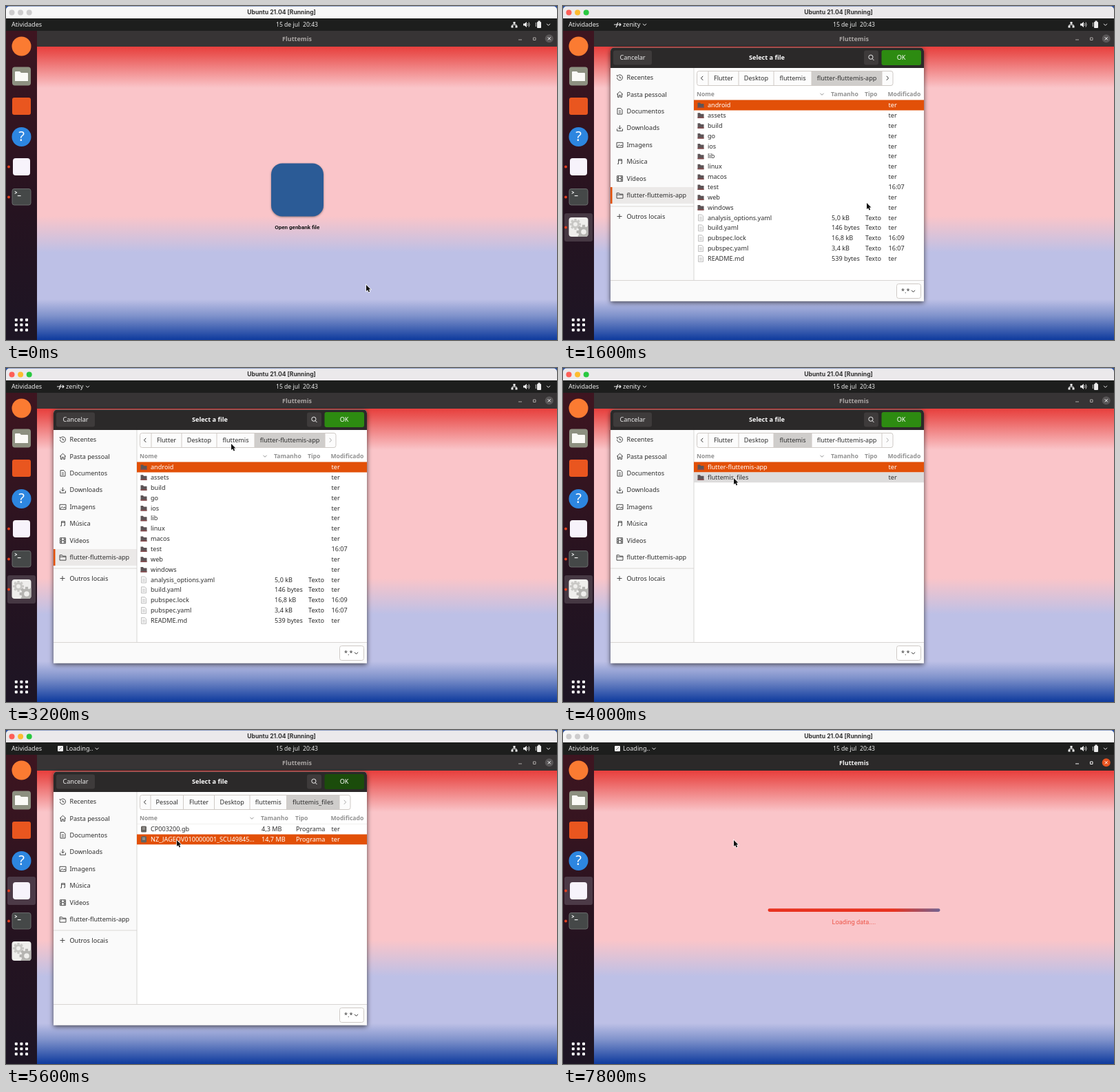
Animation of 800 by 485 pixels, one loop 8 s. Source, as an HTML page with a canvas:

```html
<!DOCTYPE html>
<html lang="pt">
<head>
<meta charset="utf-8">
<title>Desktop file picker</title>
<style>
html, body { margin: 0; width: 100%; height: 100%; overflow: hidden; background: #000; }
canvas { display: block; width: 800px; height: 485px; }
</style>
</head>
<body>
<canvas id="stage" width="800" height="485"></canvas>
<script>
const ctx = document.getElementById('stage').getContext('2d');
const LOOP = 8000, STEP = 200;
const UI = '"Noto Sans", sans-serif';
const ORANGE = '#e25008', INK = '#2e2e2e';

// Moments at which the scene changes, in ms
const CLICK = 1000, OPEN = 1200, SETTLED = 1800, PARENT = 3400, FILES = 4400;
const PICKED = 5200, CONFIRMED = 5400, HOST_BLUR = 6000, LOADING = 6200;

// Pointer rests: [time, x, y]
const pointerPath = [[0, 523, 405], [200, 523, 405], [800, 441, 286], [2000, 441, 286],
  [3000, 327, 110], [3400, 327, 110], [4000, 248, 160]];

function box(x, y, w, h, fill, r = 0, stroke) {
  ctx.beginPath();
  ctx.roundRect(x, y, w, h, r);
  if (fill) { ctx.fillStyle = fill; ctx.fill(); }
  if (stroke) { ctx.strokeStyle = stroke; ctx.lineWidth = 1; ctx.stroke(); }
}
function disc(x, y, r, fill) {
  ctx.beginPath();
  ctx.arc(x, y, r, 0, 7);
  ctx.fillStyle = fill;
  ctx.fill();
}
function path(d, x, y, { fill, stroke, width = 1 }) {
  const p = new Path2D(d);
  ctx.save();
  ctx.translate(x, y);
  if (fill) { ctx.fillStyle = fill; ctx.fill(p); }
  if (stroke) { ctx.strokeStyle = stroke; ctx.lineWidth = width; ctx.stroke(p); }
  ctx.restore();
}
function text(s, x, y, color = INK, { size = 9.1, bold = false, align = 'left', family = UI } = {}) {
  ctx.font = `${bold ? 'bold ' : ''}${size}px ${family}`;
  ctx.textAlign = align;
  ctx.fillStyle = color;
  ctx.fillText(s, x, y + 3.1);
}
function vertical(y0, y1, stops) {
  const g = ctx.createLinearGradient(0, y0, 0, y1);
  for (const [y, color] of stops) g.addColorStop((y - y0) / (y1 - y0), color);
  return g;
}
const chevron = (x, y, color) => path('M-2.5 -1.2L0 1.3L2.5 -1.2', x, y, { stroke: color });

function hostBar(active) {
  box(0, 0, 800, 20, '#2c509c');
  box(0, 0.5, 800, 22, active ? '#ebe9eb' : '#f7f7f7', 5);
  const lights = active ? ['#fe5f57', '#fdbc2e', '#29c840'] : ['#cdcccd', '#cdcccd', '#cdcccd'];
  lights.forEach((c, i) => disc(8.5 + i * 12.6, 9.5, 4, c));
  text('Ubuntu 21.04 [Running]', 400, 9, '#303030',
    { size: 8.6, bold: true, align: 'center', family: 'Inter, sans-serif' });
}

function topBar(t) {
  const white = '#ececec';
  box(0, 18, 800, 18, '#1d1e1d');
  text('Atividades', 8, 27, white);
  if (t >= CONFIRMED) {
    box(75, 23, 8, 8, '#f0f0f0', 1);
    path('M2 6L6 2', 75, 23, { stroke: '#8a8a8a' });
    text('Loading..', 87, 27, white);
    chevron(132, 27, white);
  } else if (t >= OPEN) {
    path('M0 4H4L6 1M3 8L5 4H10M8 2L10 4L8 6', 74, 23, { stroke: white, width: 1.2 });
    text('zenity', 87, 27, white);
    chevron(118.5, 27, white);
  }
  text('15 de jul', 392, 27, white, { size: 8.6 });
  text('20:43', 431, 27, white, { size: 8.6 });
  path('M-1.5 -4H1.5V-1H-1.5ZM-4.5 1.5H-1.5V4.5H-4.5ZM1.5 1.5H4.5V4.5H1.5Z', 738, 27, { fill: white });
  path('M0 -1V.3M-3 2V.3H3V2', 738, 27, { stroke: white });
  path('M-4 -1.5H-2L1 -4V4L-2 1.5H-4Z', 755, 27, { fill: white });
  path('M2.4 -2Q4 0 2.4 2M4 -3.5Q6.4 0 4 3.5', 755, 27, { stroke: white, width: .8 });
  box(771, 23, 6, 9, white, 1);
  box(772.5, 21.5, 3, 2, white);
  path('M0 -3V3', 769.3, 27, { stroke: white, width: .8 });
  chevron(787.5, 27, white);
}

function appWindow(focused) {
  box(45, 59, 755, 426, vertical(59, 485, [[59, '#e83f3d'], [70, '#ea5654'], [119, '#fac5c9'],
    [305, '#fac5c9'], [358, '#bdc0e6'], [426, '#bdc0e6'], [450, '#7f92cb'], [485, '#0e3a9d']]));
  box(45, 36, 755, 23, focused ? '#2b2929' : '#373435');
  const color = focused ? '#f5f5f5' : '#aaa6a4';
  text('Fluttemis', 422.5, 47.5, color, { size: 9, bold: true, align: 'center' });
  path('M-2.5 1.5H2.5', 746.5, 47.5, { stroke: color });
  box(765.5, 46, 3.5, 3.5, null, 0, color);
  disc(788.7, 47.3, 6, focused ? '#e95420' : '#595657');
  path('M-2 -2L2 2M2 -2L-2 2', 788.7, 47.3, { stroke: '#fff' });
}

function gear(x, y, r, color) {
  ctx.strokeStyle = color;
  ctx.lineWidth = r * .45;
  ctx.beginPath();
  ctx.arc(x, y, r * .65, 0, 7);
  ctx.stroke();
  for (let i = 0; i < 8; i++) {
    const a = i * Math.PI / 4, c = Math.cos(a), s = Math.sin(a);
    ctx.beginPath();
    ctx.moveTo(x + c * r * .8, y + s * r * .8);
    ctx.lineTo(x + c * r * 1.15, y + s * r * 1.15);
    ctx.stroke();
  }
}

function dock(t) {
  box(0, 36, 45, 449, vertical(36, 485, [[36, '#3e1520'], [180, '#321420'], [300, '#251320'], [485, '#1d1524']]));
  const picker = t >= OPEN && t < LOADING;
  if (t >= CONFIRMED) box(2, 213, 41, 41, '#4c3a47', 3);
  else if (picker) box(2, 301, 41, 41, '#463843', 3);

  disc(22.5, 58.5, 14, '#fb7b32');
  box(9, 88.5, 27, 27, '#8d9080', 4);
  path('M0 1Q0 0 1 0H7L9 2H18Q19 2 19 3V14H0Z', 13, 95, { fill: '#fafaf6' });
  box(9, 133, 27, 25, '#e9561f', 3);
  disc(22.5, 190, 14, '#2d86e0');
  text('?', 22.5, 192.5, '#fff', { size: 20, align: 'center' });
  box(10, 221, 25, 25, '#f7f3fb', 4);
  box(9, 265.5, 27, 23.5, '#454848', 3, '#686b6b');
  text('>_', 12, 271, '#fff', { size: 8, bold: true, family: '"Noto Sans Mono", monospace' });
  if (picker) {
    box(8.5, 307, 28, 28, '#efeeec', 4);
    ctx.save();
    ctx.beginPath();
    ctx.roundRect(8.5, 307, 28, 28, 4);
    ctx.clip();
    gear(18, 317, 7, '#c9c8c5');
    gear(30, 328, 9, '#b5b4b1');
    ctx.restore();
  }
  disc(4, 233.5, 2, '#e2401f');
  disc(4, 277.5, 2, '#e2401f');
  if (picker && t < CONFIRMED) disc(4, 321.5, 2, '#e2401f');
  for (let i = 0; i < 9; i++) box(12.8 + i % 3 * 7.6, 453.8 + Math.floor(i / 3) * 7.3, 4, 4, '#fff', 1);
}

function openButton() {
  ctx.save();
  ctx.shadowColor = '#0006';
  ctx.shadowBlur = 3;
  ctx.shadowOffsetY = 1;
  box(385, 228.5, 76, 77, '#2b5b96', 16);
  ctx.restore();
  text('Open genbank file', 422.7, 320.8, '#151515',
    { size: 8, bold: true, align: 'center', family: 'Roboto, sans-serif' });
}

function loader(t) {
  const left = 297.5, width = 250;
  const center = Math.min(592, 340 + (t - 6400) / 3);
  const g = ctx.createLinearGradient(center - 1.5 * width, 0, center + 1.5 * width, 0);
  [[.35, '#e8321f'], [.5, '#2383dc'], [.65, '#e8321f']].forEach(([p, c]) => g.addColorStop(p, c));
  box(left, 259.2, width, 4.8, g, 2.4);
  ctx.globalAlpha = .75;
  text('Loading data....', 422.3, 279, g, { size: 9.3, align: 'center', family: 'Roboto, sans-serif' });
  ctx.globalAlpha = 1;
}

const folderShape = 'M-4.5 -3.5H-1L0 -2H4.5V4H-4.5Z';
const places = [
  ['Recentes', 'M-4 0A4 4 0 1 0 -2.5 -3.2M-4 -4V-2H-2M0 -2V.5H2'],
  ['Pasta pessoal', 'M-4.5 0L0 -4.2L4.5 0M-3 -1V4H-1V1H1V4H3V-1'],
  ['Documentos', 'M-3.5 -4.2H1.5L3.5 -2V4.2H-3.5ZM-1.5 -.5H1.5M-1.5 2H1.5'],
  ['Downloads', 'M0 -4V1.5M-2.5 -1L0 1.5L2.5 -1M-4 1V4H4V1'],
  ['Imagens', 'M-4.5 -3.5H4.5V3.5H-4.5ZM-4 3L-1 -.5L1 1.5L2.5 0L4 2'],
  ['Música', 'M-2 3V-3.5H3V2.5M-3.6 3H-2M1.4 2.5H3M-2 -2H3'],
  ['Vídeos', 'M-4 -4H4V4H-4ZM-2 -4V4M2 -4V4M-2 0H2M-4 -1.5H-2M-4 1.5H-2M2 -1.5H4M2 1.5H4'],
  ['flutter-fluttemis-app', folderShape + 'M-4.5 -1H4.5'],
];

function sidebar(currentPlace) {
  box(69, 90, 121, 308, '#fafafa');
  if (currentPlace) {
    box(69, 263, 121, 24, '#ebe9e8');
    box(69, 263, 2.5, 24, ORANGE);
  }
  places.forEach(([label, icon], i) => {
    const y = 104 + i * 24.45;
    path(icon, 82.5, y, { stroke: '#4b4b4b' });
    text(label, 92.5, y);
  });
  box(69, 290.5, 121, 1, '#dcdad8');
  path('M-3.5 0H3.5M0 -3.5V3.5', 82, 305.5, { stroke: '#4b4b4b' });
  text('Outros locais', 92.5, 305.5);
  box(189.5, 90, 1, 308, '#d8d5d3');
}

const folder = (name, modified = 'ter') => ({ name, kind: 'folder', modified });
const file = (name, size, modified = 'ter', type = 'Texto') => ({ name, kind: type, size, type, modified });
const project = {
  edges: [211, 255, 306, 361, 463, 479], active: 3, columns: [389, 438],
  crumbs: ['Flutter', 'Desktop', 'fluttemis', 'flutter-fluttemis-app'],
  rows: [...'android assets build go ios lib linux macos'.split(' ').map(n => folder(n)),
    folder('test', '16:07'), folder('web'), folder('windows'),
    file('analysis_options.yaml', '5,0 kB'), file('build.yaml', '146 bytes'),
    file('pubspec.lock', '16,8 kB', '16:09'), file('pubspec.yaml', '3,4 kB', '16:07'),
    file('README.md', '539 bytes')],
};
const parent = { ...project, active: 2, rows: [folder('flutter-fluttemis-app'), folder('fluttemis_files')] };
const genomes = {
  edges: [210, 257.5, 302.5, 354, 407.5, 484, 500], active: 4, columns: [370, 420],
  crumbs: ['Pessoal', 'Flutter', 'Desktop', 'fluttemis', 'fluttemis_files'],
  rows: [file('CP003200.gb', '4,3 MB', 'ter', 'Programa'),
    file('NZ_JAGEQV010000001_SCU49845…', '14,7 MB', 'ter', 'Programa')],
};

function pathBar({ edges, crumbs, active }, canGoForward) {
  const end = edges[edges.length - 1], line = '#cfcac6';
  box(194.5, 94.5, end - 194.5, 21, '#fcfcfc', 3, line);
  crumbs.forEach((label, i) => {
    if (i === active) box(edges[i], 95, edges[i + 1] - edges[i], 20, '#cfcdcb');
    text(label, (edges[i] + edges[i + 1]) / 2, 104.5, INK, { align: 'center' });
  });
  edges.slice(0, -1).forEach(x => box(x - .5, 95, 1, 20, line));
  path('M1.2 -3L-1.5 0L1.2 3', 202, 104.8, { stroke: INK });
  path('M-1.2 -3L1.5 0L-1.2 3', end - 8, 104.8, { stroke: canGoForward ? INK : '#a9a9a9' });
}

function rowIcon(kind, y) {
  if (kind === 'folder') {
    path(folderShape, 200, y, { fill: '#5d5557' });
    box(195.5, y + 2.5, 9, 1.5, '#8a4a4c');
  } else if (kind === 'Programa') {
    box(196, y - 4.5, 8, 9, '#66635f', 1.5);
    path('M-2 -2H2M-2 0H2', 200, y, { stroke: '#b9b6b2' });
  } else {
    path('M-3.5 -4.5H1.5L3.5 -2.5V4.5H-3.5Z', 200, y, { fill: '#f5f5f5', stroke: '#b5b5b5', width: .8 });
    path('M-1.8 -.5H1.8M-1.8 1.8H1.8', 200, y, { stroke: '#b5b5b5', width: .8 });
  }
}

function fileList({ rows, columns: [sizeX, typeX] }, selected, hovered) {
  const head = { size: 8.6, bold: true }, grey = '#929292';
  text('Nome', 194, 128, grey, head);
  text('Tamanho', sizeX, 128, grey, head);
  text('Tipo', typeX, 128, grey, head);
  text('Modificado', 471.5, 128, grey, head);
  chevron(sizeX - 13, 128, grey);
  box(190, 136, 334, .6, '#e4e2e0');
  rows.forEach(({ name, kind, size, type, modified }, i) => {
    const y = 144 + i * 14.86;
    if (i === selected) box(190, y - 7.4, 334, 14.8, ORANGE);
    else if (i === hovered) box(190, y - 7.4, 334, 14.8, '#dddcdc');
    const color = i === selected ? '#fff' : INK;
    rowIcon(kind, y);
    text(name, 210, y, color);
    if (size) {
      text(size, sizeX + 1, y, color);
      text(type, typeX + 1, y, color);
    }
    text(modified, 472.5, y, color);
  });
}

function dialog(t) {
  const view = t < PARENT ? project : t < FILES ? parent : genomes;
  ctx.save();
  ctx.shadowColor = '#000a';
  ctx.shadowBlur = 7;
  ctx.shadowOffsetY = 2;
  box(69, 60.5, 455, 368, '#fff', [5, 5, 0, 0]);
  ctx.restore();

  box(69, 60.5, 455, 29.5, '#2b2929', [5, 5, 0, 0]);
  box(73, 64.5, 56, 21, '#3e3b3b', 3);
  text('Cancelar', 101, 75, '#eee', { align: 'center' });
  text('Select a file', 296, 75, '#fff', { bold: true, align: 'center' });
  box(437, 64.5, 21, 21, '#3e3b3b', 3);
  path('M2.5 -.8A3.1 3.1 0 1 0 -3.7 -.8A3.1 3.1 0 1 0 2.5 -.8M1.5 1.5L4 4', 447.5, 75, { stroke: '#eee' });
  box(462.5, 64, 57.5, 22, t >= CONFIRMED ? '#1b4c0b' : '#2d8b11', 3);
  text('OK', 491, 75, '#fff', { align: 'center' });

  sidebar(view === project);
  pathBar(view, t < SETTLED);
  fileList(view, view === genomes && t >= PICKED ? 1 : 0, view !== project && t >= 4000 ? 1 : -1);

  box(69, 398, 455, 30.5, '#fafafa');
  box(69, 398, 455, 1, '#d8d5d3');
  box(484.5, 403.5, 35, 21, '#fff', 3, '#cfcac6');
  text('*.*', 491, 414, INK);
  chevron(508.5, 414, INK);
}

function pointer(t) {
  let i = pointerPath.findIndex(([time]) => time > t);
  if (i < 0) i = pointerPath.length;
  const [t0, x0, y0] = pointerPath[i - 1];
  const [t1, x1, y1] = pointerPath[i] || [t0 + 1, x0, y0];
  const p = Math.min(1, (t - t0) / (t1 - t0)), k = p * p * (3 - 2 * p);
  path('M0 0V9L2.1 7.2L3.6 10.5L5.2 9.8L3.8 6.6H6.5Z', x0 + (x1 - x0) * k, y0 + (y1 - y0) * k,
    { stroke: '#fff', width: 1.4, fill: '#000' });
  path('M0 0V9L2.1 7.2L3.6 10.5L5.2 9.8L3.8 6.6H6.5Z', x0 + (x1 - x0) * k, y0 + (y1 - y0) * k,
    { fill: '#111' });
}

function draw(now) {
  // The screen refreshes in hard steps
  const t = Math.floor(now % LOOP / STEP) * STEP;
  hostBar(t >= CLICK && t < HOST_BLUR);
  topBar(t);
  appWindow(t >= LOADING);
  dock(t);
  if (t >= LOADING) loader(t);
  else openButton();
  if (t >= OPEN && t < LOADING) dialog(t);
  pointer(t);
}

const start = performance.now();
function tick() {
  draw(performance.now() - start);
  requestAnimationFrame(tick);
}
tick();
</script>
</body>
</html>
```
